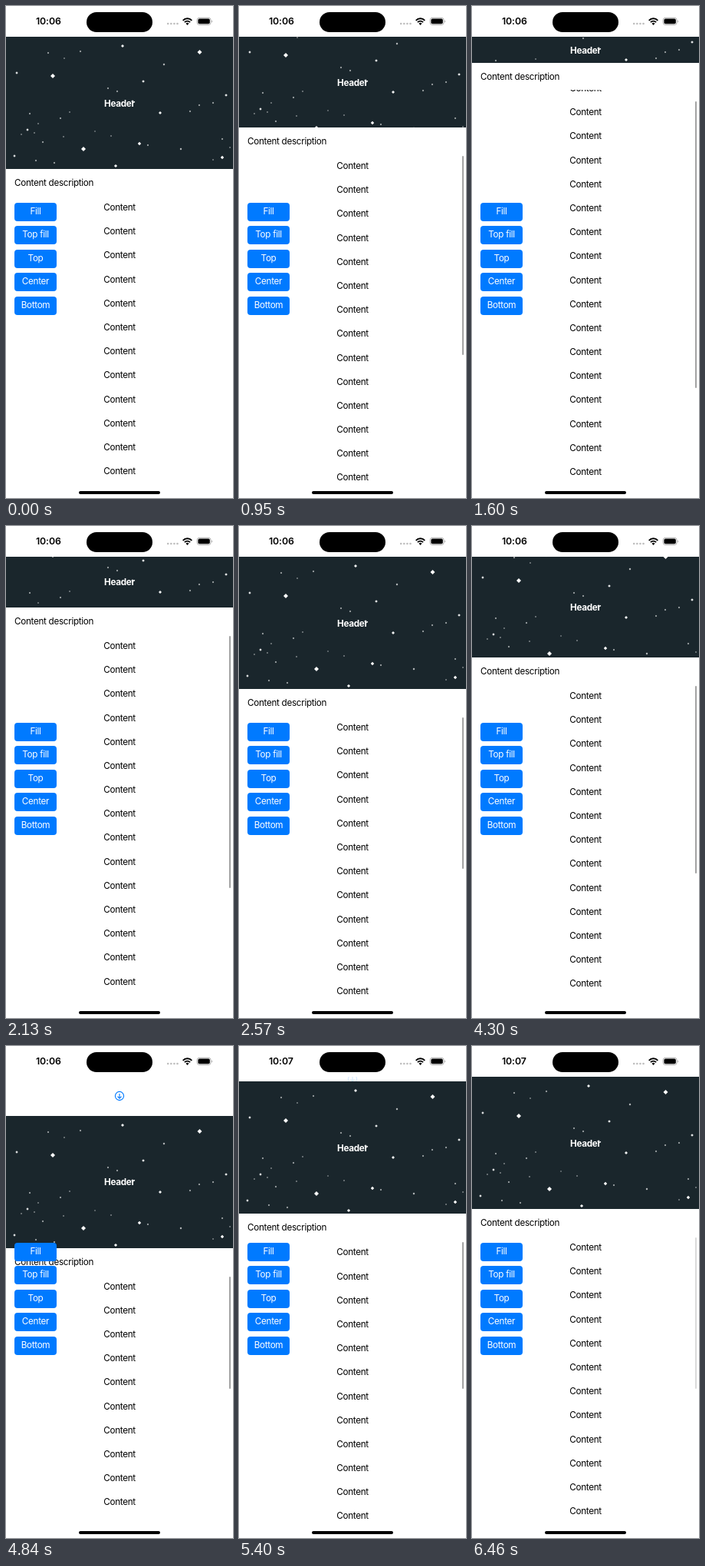
An HTML page for the animation above (6480 ms loop, 296 px wide and 640 px high).

```html
<!DOCTYPE html>
<html lang="en">
<head>
<meta charset="utf-8">
<title>Collapsing header</title>
<style>
  html, body { margin: 0; width: 100%; height: 100%; overflow: hidden; background: #fff; }
  body { font: 11.7px/20px Inter, sans-serif; letter-spacing: -.3px; color: #000; }
  .stage {
    --off: 0;
    --pull: max(0px, var(--off) * -1px);
    --shrink: clamp(0px, var(--off) * 1px, 138px);
    --scroll: max(0px, var(--off) * 1px - 138px);
    --height: calc(172px - var(--shrink));
    --edge: calc(40px + var(--pull) + var(--height));
    position: relative; width: 296px; height: 640px; overflow: hidden; background: #fff;
  }
  .stage > * { position: absolute; }
  .gap { left: 0; top: 40px; width: 100%; height: var(--pull); overflow: hidden; }
  .gap svg { position: absolute; left: 141px; top: calc(50% - 7px); fill: none; stroke: #007aff; stroke-width: 1.1; }
  .header { left: 0; top: calc(40px + var(--pull)); width: 100%; height: var(--height); overflow: hidden; background: #1a262c; }
  .header svg { position: absolute; left: 0; top: calc(50% - 86px); }
  .header b { position: absolute; left: 0; width: 100%; top: calc(50% - 9.5px); text-align: center; color: #fff; }
  .about { left: 11px; top: calc(var(--edge) + 8px); white-space: nowrap; }
  .list { left: 0; width: 100%; top: calc(var(--edge) + 35px); bottom: 23px; overflow: hidden; text-align: center; }
  .rows { transform: translateY(calc(var(--scroll) * -1)); }
  .rows div { height: 31.2px; line-height: 31.2px; }
  .bar { left: 291px; width: 2.4px; border-radius: 2px; background: rgba(0, 0, 0, .36); }
  .buttons { left: 11px; top: 256px; }
  .buttons div {
    width: 55px; height: 23.6px; margin-bottom: 6.9px; line-height: 23.6px;
    border-radius: 4px; background: #007aff; color: #fff; text-align: center;
  }
  .clock { left: 39px; top: 10px; font-size: 12.3px; font-weight: 600; letter-spacing: -.1px; }
  .island { left: 104.5px; top: 7.5px; width: 86.5px; height: 26px; border-radius: 13px; background: #000; }
  .status { left: 206px; top: 12px; }
  .home { left: 95px; top: 631px; width: 106px; height: 3.6px; border-radius: 2px; background: #000; }
</style>
</head>
<body>
<div class="stage">
  <div class="gap">
    <svg width="14" height="14"><circle cx="7" cy="7" r="5.6"/><path d="M7 3.9V10M4.5 7.6L7 10.1l2.5-2.5"/></svg>
  </div>
  <div class="header">
    <svg width="296" height="172" fill="#fff"></svg>
    <b>Header</b>
  </div>
  <div class="about">Content description</div>
  <div class="list"><div class="rows"></div></div>
  <div class="bar"></div>
  <div class="buttons">
    <div>Fill</div><div>Top fill</div><div>Top</div><div>Center</div><div>Bottom</div>
  </div>
  <div class="clock">10:06</div>
  <div class="island"></div>
  <svg class="status" width="70" height="16">
    <g fill="#bdbdbd">
      <circle cx="5.2" cy="11" r="1.3"/><circle cx="9.3" cy="11" r="1.3"/><circle cx="13.4" cy="11" r="1.3"/><circle cx="17.5" cy="11" r="1.3"/>
    </g>
    <g fill="none" stroke="#000" stroke-width="1.9">
      <path d="M24.7 6.8a8 8 0 0 1 11.6 0"/><path d="M26.9 9.2a5 5 0 0 1 7.2 0"/>
    </g>
    <path d="M28.5 10.8a2.9 2.9 0 0 1 4 0l-2 2.1z"/>
    <rect x="43.1" y="3.3" width="18" height="9.2" rx="3" fill="none" stroke="#a8a8a8" stroke-width=".9"/>
    <rect x="44.4" y="4.6" width="15.4" height="6.6" rx="1.8"/>
    <path d="M62.3 6.4a1.6 1.6 0 0 1 0 3z" fill="#a8a8a8"/>
  </svg>
  <div class="home"></div>
</div>
<script>
  const $ = s => document.querySelector(s);
  const stage = $('.stage'), bar = $('.bar'), clock = $('.clock'), icon = $('.gap svg');
  const LOOP = 6480;

  // x, y, radius
  const STARS = [
    [152, 12, 2], [252.5, 20, 3], [61, 51, 3], [101, 146, 3], [14, 47, 1.7],
    [55, 21, 1.2], [97, 19, 1.2], [76, 28, 1], [206, 36, 1.4], [179, 58, 1.8],
    [133, 67, 1.2], [287, 76, 1.8], [270, 86, 1.2], [145, 71, 1.2], [165, 84, 1.8],
    [201, 99, 2], [240, 97, 1.2], [252, 89, 1.2], [31, 100, 1.2], [83, 98, 1],
    [71, 106, 1.2], [42, 113, 1], [28, 121, 1.7], [37, 125, 1], [20, 127, 1],
    [174, 139, 2.2], [116, 123, .9], [137, 129, 1], [185, 141, 1.2], [228, 146, 1.4],
    [48, 137, 1.2], [75, 130, 1], [11, 155, 1.7], [39, 161, 1.2], [143, 168, 2.1],
    [282, 157, 2.2], [282, 133, 1.2], [270, 160, 1], [63, 164, 1.2], [292, 144, 1]
  ];
  $('.header svg').innerHTML = STARS.map(([x, y, r]) =>
    `<path d="M${x} ${y - r}l${r} ${r} ${-r} ${r} ${-r} ${-r}z" opacity="${Math.min(1, .35 + r * .3)}"/>`).join('');
  $('.rows').innerHTML = '<div>Content</div>'.repeat(22);

  // Bursts of screen updates: first, last, count
  const BURSTS = [
    [730, 1280, 6], [1380, 1930, 6], [2030, 2570, 6], [3090, 3520, 5],
    [3680, 4300, 7], [4420, 5060, 7], [5170, 5510, 4], [6330, 6460, 2]
  ];
  const TICKS = BURSTS.flatMap(([a, b, n]) =>
    Array.from({ length: n }, (_, i) => Math.floor((a + (b - a) * i / (n - 1)) / 10) * 10));
  const hold = t => TICKS.reduce((last, tick) => tick <= t ? tick : last, 0);

  // Scroll offset over time
  const DRAG = [
    [0, 0], [700, 0], [950, 54], [1280, 148], [1600, 155], [1800, 158], [1930, 155],
    [2150, 100], [2350, 30], [2570, 0], [3060, 0], [3300, 94], [3520, 191.5],
    [3620, 191.5], [4000, 104], [4300, 41], [4840, -50.6], [5030, -60],
    [5280, -18], [5510, 0], [LOOP, 0]
  ];
  const slope = i => (DRAG[i + 1][1] - DRAG[i][1]) / (DRAG[i + 1][0] - DRAG[i][0]);
  const tangent = i => {
    if (i === 0 || i === DRAG.length - 1) return 0;
    const a = slope(i - 1), b = slope(i);
    return a * b > 0 ? 2 * a * b / (a + b) : 0;
  };
  function offset(t) {
    let i = 0;
    while (DRAG[i + 1][0] < t) i++;
    const [x0, y0] = DRAG[i], [x1, y1] = DRAG[i + 1];
    const h = x1 - x0, u = (t - x0) / h, v = 1 - u;
    return y0 * v * v * (1 + 2 * u) + y1 * u * u * (3 - 2 * u)
      + h * u * v * (tangent(i) * v - tangent(i + 1) * u);
  }

  function draw(t) {
    const off = offset(t);
    stage.style.setProperty('--off', off.toFixed(2));
    icon.style.opacity = Math.min(1, Math.max(0, -off / 40));

    const shrink = Math.min(off, 138);
    const top = 249 - shrink, track = 615 - top, total = 680;
    bar.style.top = top + (off - shrink) * track / total + 'px';
    bar.style.height = track * track / total + 'px';
    bar.style.opacity = t < 730 ? 0 : t < 6330 ? 1 : t < 6460 ? .75 : .4;

    clock.textContent = t < 5280 ? '10:06' : '10:07';
  }

  const start = performance.now();
  function frame() {
    draw(hold((performance.now() - start) % LOOP));
    requestAnimationFrame(frame);
  }
  frame();
</script>
</body>
</html>
```
